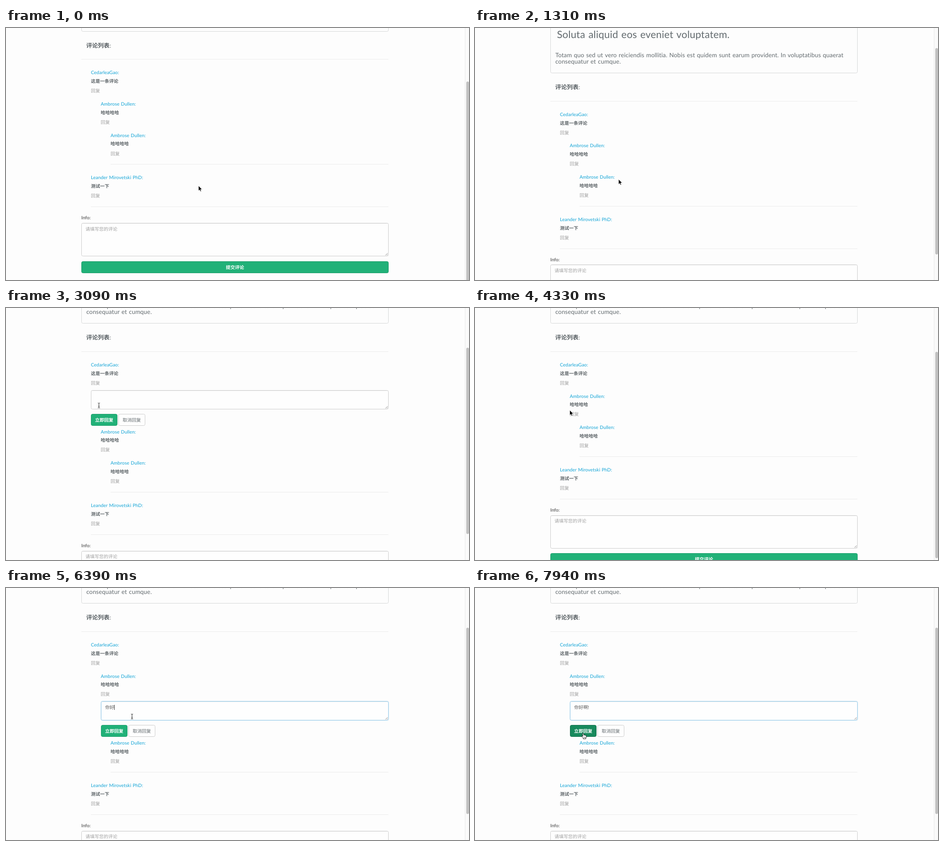
Write an HTML page that moves like this. It is 1014 px wide and 552 px high and loops after 8000 ms.

```html
<!DOCTYPE html>
<html lang="zh-CN">
<head>
<meta charset="utf-8">
<title>评论列表</title>
<style>
  html, body { margin: 0; width: 100%; height: 100%; overflow: hidden; background: #fdfdfd; }
  svg { display: block; width: 1014px; height: 552px; }
  text {
    font: 10px Lato, "Noto Sans CJK SC", "Noto Sans CJK", sans-serif;
    fill: #636b6f; white-space: pre; text-rendering: geometricPrecision;
  }
  .latin { letter-spacing: .009em; word-spacing: .06em; }
  .head { font-size: 22px; }
  .para { font-size: 13.2px; }
  .name { font-size: 10.27px; fill: #12a4d6; }
  .bold { font-weight: 700; fill: #5b6266; }
  .title { font-size: 12.8px; }
  .reply, .hint { fill: #a0a0a0; }
  .hot { fill: #216a94; text-decoration: underline; }
  .info { font-weight: 600; fill: #555; }
  .white { fill: #fff; font-weight: 700; }
  .mid { text-anchor: middle; }
  .typed { fill: #555; }
</style>
</head>
<body>
<svg id="stage" viewBox="0 0 1014 552"></svg>
<script>
const LOOP = 8000, STEP = 118, RIGHT = 837.5;
const GAP = 68.6, RULE_GAP = 92.8, FORM_H = 78;
const stage = document.getElementById('stage');

// Moves: start time, number of steps, then where the move ends.
const scroll = [[0, 1, -26.5], [330, 4, 72.5], [1310, 5, 0]];
const pointer = [
  [0, 1, 421.5, 345.5], [120, 1, 399.5, 337], [900, 3, 326, 340], [1310, 5, 213.5, 256.5],
  [1990, 1, 204, 204], [2200, 3, 189, 162], [2970, 2, 203, 212], [3200, 3, 189, 163],
  [3920, 1, 203, 203], [4100, 3, 209, 231], [4860, 2, 240, 306], [5090, 3, 275.5, 280],
  [7460, 3, 282, 308], [7820, 2, 236.5, 318]
];
const toggles = [[2670, 0], [3800, -1], [4570, 1]];
const FOCUS = 5200, BLUR = 7820;
const message = '你好啊!', keyTimes = [6270, 6270, 6610, 7460];

const comments = [
  { depth: 0, name: 'CedarleaGao:', body: '这是一条评论' },
  { depth: 1, name: 'Ambrose Dullen:', body: '哈哈哈哈' },
  { depth: 2, name: 'Ambrose Dullen:', body: '哈哈哈哈', last: true },
  { depth: 0, name: 'Leander Mirovetski PhD:', body: '测试一下', last: true }
];

const smooth = u => u * u * (3 - 2 * u);
const snap = v => Math.floor(v) + .5;
const inside = (p, x, y, w, h) => p.x >= x && p.x <= x + w && p.y >= y && p.y <= y + h;

// Eased position along the current move, advancing in whole steps.
function follow(moves, t) {
  const i = moves.filter(m => m[0] <= t).length - 1;
  const [start, steps, ...to] = moves[i];
  const from = moves[Math.max(i - 1, 0)].slice(2);
  const u = smooth(Math.min(1, (Math.floor((t - start) / STEP) + 1) / steps));
  return to.map((v, k) => from[k] + (v - from[k]) * u);
}

const text = (x, y, cls, s) => `<text x="${x}" y="${y + 3.7}" class="${cls}">${s}</text>`;
const rule = (x, y) => `<path d="M${x} ${snap(y)}H${RIGHT}" stroke="#ebebeb"/>`;
const box = (x, y, w, h, fill, stroke, extra = '') =>
  `<rect x="${x}" y="${y}" width="${w}" height="${h}" rx="3" fill="${fill}" stroke="${stroke}" ${extra}/>`;

function area(x, y, h, focus) {
  const w = RIGHT - x, b = y + h;
  return (focus ? box(x, y, w, h, 'none', '#98cbe8', 'stroke-width="3" opacity=".3"') : '') +
    box(x, y, w, h, '#fefefe', focus ? '#98cbe8' : '#ccc') +
    `<path d="M${x + 2} ${y + 1}H${RIGHT - 2}" stroke="#000" opacity=".05"/>` +
    `<path d="M831 ${b - 1.5}l5 -5M834 ${b - 1.5}l2 -2" stroke="#777" stroke-width=".8"/>`;
}

function green(x, y, w, label, hot) {
  return box(x, y, w, 25, hot ? '#188a5d' : '#21b178', hot ? '#116c48' : '#1c9d6a') +
    text(x + w / 2, y + 12.9, 'white mid', label);
}

const shapes = {
  arrow: '<path d="M0 0V11.3L2.6 8.9L4.3 12.7L6.2 11.9L4.6 8.2H8.1Z" fill="#000" stroke="#fff" stroke-width=".8"/>',
  hand: '<path d="M-1.2 .8Q0 -.8 1.1 .8L1.8 4.3Q3 3.3 3.9 4.6Q5 3.9 5.8 5.1Q7.2 4.8 7.4 6.4Q7.7 9 6.3 10.7V12.4H.5V11Q-1.2 9.3 -2.8 6.9Q-2.7 5.4 -1.3 6L-.3 7Z" fill="#fff" stroke="#000" stroke-width=".9"/>' +
    '<path d="M2 8.2V10.4M3.6 8.2V10.4M5.1 8.2V10.4" stroke="#000" stroke-width=".6"/>',
  beam: '<path d="M-1.7 -4Q.5 -4 .5 -2.5Q.5 -4 2.7 -4M.5 -2.5V5.5M-1.7 7Q.5 7 .5 5.5Q.5 7 2.7 7M-.7 3.5H1.7" fill="none" stroke="#222"/>'
};

function typing(x, y, t) {
  const hits = keyTimes.filter(k => k <= t);
  const words = message.slice(0, hits.length);
  const end = x + [...words].reduce((w, c) => w + (c === '!' ? 2 : 10), 0);
  const idle = t - (hits.pop() || FOCUS);
  const caret = t >= FOCUS && t < BLUR && idle % 1000 < 500;
  return text(x - .3, y + 13, 'typed', words) +
    (caret ? `<path d="M${end} ${y + 7.5}v11" stroke="#333"/>` : '');
}

function replyForm(x, y, p, t) {
  const cx = x + 60, by = y + 52;
  const send = inside(p, x, by, 57, 25), cancel = inside(p, cx, by, 58, 25);
  const out = area(x, y, 41, t >= FOCUS) + typing(x + 9, y, t) +
    green(x, by, 57, '立即回复', send) +
    box(cx, by, 58, 25, cancel ? '#e6e6e6' : '#fefefe', cancel ? '#adadad' : '#ccc') +
    text(cx + 29, by + 12.9, 'mid', '取消回复');
  const kind = send || cancel ? 'hand' : inside(p, x, y, RIGHT - x, 41) ? 'beam' : null;
  return { out, kind };
}

function article(dy) {
  return box(165.5, -100, 672, snap(33.9 + dy) + 100, 'none', '#d6d7d8') +
    text(179.5, dy - 46.4, 'latin head', 'Soluta aliquid eos eveniet voluptatem.') +
    text(176, dy - 4.2, 'latin para', 'Totam quo sed ut vero reiciendis mollitia. Nobis est quidem sunt earum provident. In voluptatibus quaerat') +
    text(176, dy + 9.4, 'latin para', 'consequatur et cumque.') +
    text(175.7, dy + 65.4, 'bold title', '评论列表<tspan font-weight="400">:</tspan>') +
    rule(165, dy + 95.4);
}

function scrollbar(dy, open) {
  const top = open ? 87 : 96 - dy * .8;
  return '<path d="M1005 0H1014V552H1005Z" fill="#fafafa"/><path d="M1005.5 0V552" stroke="#e8e8e8"/>' +
    `<rect x="1008" y="${top}" width="6" height="${open ? 408 : 452}" rx="3" fill="#c1c1c1"/>`;
}

function draw(t) {
  const [dy] = follow(scroll, t);
  const [x, y] = follow(pointer, t);
  const p = { x, y };
  const open = toggles.reduce((held, [time, i]) => time <= t ? i : held, -1);
  let kind = 'arrow', top = 124.2 + dy, out = article(dy);

  comments.forEach((c, i) => {
    const left = 186 + c.depth * 21.5;
    const hot = inside(p, left, top + 34, 20, 12);
    if (hot) kind = 'hand';
    out += text(left, top, 'latin name', c.name) +
      text(left, top + 18.8, 'bold', c.body) +
      text(left, top + 39.9, hot ? 'hot' : 'reply', '回复');
    if (open === i) {
      const form = replyForm(snap(left + .5), snap(top + 55.8), p, t);
      out += form.out;
      kind = form.kind || kind;
      top += FORM_H;
    }
    if (c.last) out += rule(left, top + 64);
    top += c.last ? RULE_GAP : GAP;
  });

  out += text(165, top - 5, 'latin info', 'Info:') +
    area(165.5, snap(top + 7), 72, false) +
    text(174, top + 19.5, 'hint', '请填写您的评论') +
    green(165.5, snap(top + 90.6), 672, '提交评论', false) +
    scrollbar(dy, open >= 0);

  // The pointer turns into an arrow while the input method switches.
  if (t >= 5920 && t < 6030) kind = 'arrow';
  return out + `<g transform="translate(${x} ${y})" stroke-linejoin="round">${shapes[kind]}</g>`;
}

let shown = '';
const start = performance.now();
function tick() {
  const next = draw((performance.now() - start) % LOOP);
  if (next !== shown) stage.innerHTML = shown = next;
  requestAnimationFrame(tick);
}
tick();
</script>
</body>
</html>
```
